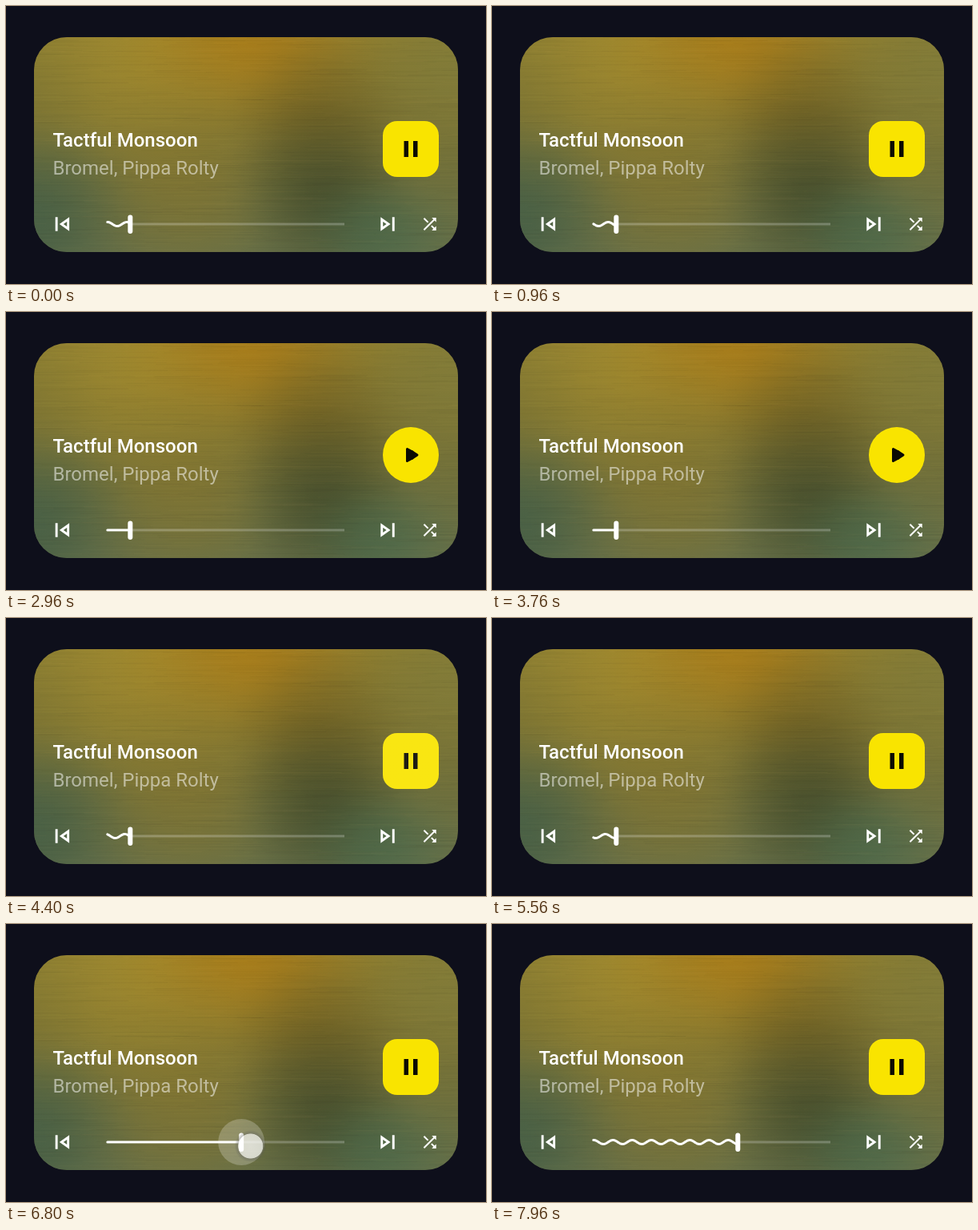
An HTML page with a canvas that plays this animation: 600x348 px, repeating every 8 s.

```html
<!DOCTYPE html>
<html lang="en">
<head>
<meta charset="utf-8">
<title>Music player card</title>
<style>
  html, body { margin: 0; width: 100%; height: 100%; overflow: hidden; background: #0e0f1b; }
  #stage { position: relative; width: 600px; height: 348px; }
  canvas { position: absolute; left: 0; top: 0; }
  p {
    position: absolute; left: 58.5px; margin: 0; white-space: nowrap;
    font: 400 24px/28px Roboto, sans-serif; color: rgba(255, 255, 255, .52);
  }
  #title { top: 154px; font-weight: 500; color: #fff; }
  #artist { top: 189px; }
</style>
</head>
<body>
<div id="stage">
  <canvas id="back" width="600" height="348"></canvas>
  <p id="title">Tactful Monsoon</p>
  <p id="artist">Bromel, Pippa Rolty</p>
  <canvas id="front" width="600" height="348"></canvas>
</div>
<script>
const LOOP = 8000;
const TAPS = [{ down: 1960, up: 2120 }, { down: 3960, up: 4120 }];
const DRAG = { down: 6130, from: 6200, to: 7033, up: 7200 };
const TAP_POINT = { x: 525, y: 201 };
const BUTTON = { x: 471, y: 144, size: 70 };
const TRACK = { left: 126, right: 423, y: 273 };
const WAVE = { length: 24, height: 2.5, period: 4000 };
const YELLOW = '#f9e400';

const ICONS = [
  { x: 53, y: 255.6, scale: 1.45, path: 'M6 6h2v12H6zm3.5 6l8.5 6V6l-8.5 6zm6.5 2.14L12.97 12 16 9.86v4.28z' },
  { x: 459.6, y: 255.6, scale: 1.45, path: 'M6 18l8.5-6L6 6v12zm2-8.14L11.03 12 8 14.14V9.86zM16 6h2v12h-2z' },
  { x: 517.7, y: 261, scale: 1, path: 'M10.59 9.17 5.41 4 4 5.41l5.17 5.17 1.42-1.41zM14.5 4l2.04 2.04L4 18.59 5.41 20 17.96 7.46 20 9.5V4h-5.5zm.33 9.41-1.41 1.41 3.13 3.13L14.5 20H20v-5.5l-2.04 2.04-3.13-3.13z' }
];

const back = document.getElementById('back').getContext('2d');
const ctx = document.getElementById('front').getContext('2d');

const clamp = v => Math.min(1, Math.max(0, v));
const mix = (a, b, p) => a + (b - a) * p;
const ramp = (t, start, span) => clamp((t - start) / span);
const easeOut = p => 1 - (1 - p) ** 3;
const easeInOut = p => p < .5 ? 4 * p ** 3 : 1 - 4 * (1 - p) ** 3;
const white = alpha => `rgba(255,255,255,${alpha})`;

function roundRect(c, x, y, w, h, r) {
  c.beginPath();
  c.roundRect(x, y, w, h, r);
}

function disc(x, y, r, fill) {
  ctx.fillStyle = fill;
  ctx.beginPath();
  ctx.arc(x, y, r, 0, Math.PI * 2);
  ctx.fill();
}

function glow(x, y, rx, ry, rgb, alpha) {
  back.save();
  back.translate(x, y);
  back.scale(rx, ry);
  const g = back.createRadialGradient(0, 0, 0, 0, 0, 1);
  for (let i = 0; i <= 8; i++) {
    const fall = (1 + Math.cos(Math.PI * i / 8)) / 2;
    g.addColorStop(i / 8, `rgba(${rgb},${alpha * fall})`);
  }
  back.fillStyle = g;
  back.fillRect(-1, -1, 2, 2);
  back.restore();
}

function drawCard() {
  back.save();
  roundRect(back, 35, 39, 530, 269, 41);
  back.clip();
  const base = back.createLinearGradient(0, 39, 0, 308);
  ['#8a7d32', '#7c7433', '#6e6f3c', '#666f48'].forEach((color, i) => base.addColorStop(i / 3, color));
  back.fillStyle = base;
  back.fillRect(35, 39, 530, 270);

  glow(195, 70, 210, 190, '172,144,44', .65);
  glow(310, 35, 190, 150, '172,122,20', .75);
  glow(225, 210, 150, 190, '134,118,46', .6);
  glow(390, 150, 130, 130, '98,82,26', .5);
  glow(400, 240, 130, 130, '62,72,42', .7);
  glow(30, 265, 150, 140, '64,92,70', .75);
  glow(470, 285, 120, 90, '70,104,76', .6);
  glow(570, 80, 130, 140, '128,124,60', .6);

  // Faint brushed grain
  let seed = 7;
  const random = () => (seed = seed * 16807 % 2147483647) / 2147483647;
  for (let i = 0; i < 900; i++) {
    back.fillStyle = random() < .5 ? 'rgba(255,215,110,.025)' : 'rgba(30,30,10,.03)';
    back.fillRect(random() * 560, 39 + random() * 270, 30 + random() * 90, 1);
  }
  back.restore();
}

function drawIcons() {
  back.fillStyle = '#fff';
  for (const { x, y, scale, path } of ICONS) {
    back.save();
    back.translate(x, y);
    back.scale(scale, scale);
    back.fill(new Path2D(path));
    back.restore();
  }
}

function pausedAmount(t) {
  const [stop, start] = TAPS.map(tap => easeOut(ramp(t, tap.up, 260)));
  return stop - start;
}

function drawGlyph(paused) {
  // Each bar becomes half of the triangle
  const halves = [
    [[497.5, 169, 501.5, 171.5], [503, 169, 508, 175], [503, 189, 508, 183], [497.5, 189, 501.5, 186.5]],
    [[509, 169, 507.5, 174.8], [514.5, 169, 514, 179], [514.5, 189, 514, 179], [509, 189, 507.5, 183.2]]
  ];
  ctx.fillStyle = ctx.strokeStyle = '#0b0a02';
  ctx.lineJoin = 'round';
  ctx.lineWidth = 3 * paused;
  for (const points of halves) {
    ctx.beginPath();
    for (const [x, y, playX, playY] of points) ctx.lineTo(mix(x, playX, paused), mix(y, playY, paused));
    ctx.closePath();
    ctx.fill();
    if (paused > .01) ctx.stroke();
  }
}

function drawRipple(t, { down, up }) {
  const alpha = .16 * ramp(t, down, 40) * (1 - ramp(t, up, 500));
  if (alpha <= 0) return;
  const p = ramp(t, down, 225);
  const x = mix(TAP_POINT.x, 506, p);
  const y = mix(TAP_POINT.y, 179, p);
  const r = mix(30, 75, p);
  const g = ctx.createRadialGradient(x, y, 0, x, y, r);
  g.addColorStop(.65, white(alpha));
  g.addColorStop(1, white(0));
  disc(x, y, r, g);
}

function drawButton(t) {
  const paused = pausedAmount(t);
  const { x, y, size } = BUTTON;
  ctx.save();
  roundRect(ctx, x, y, size, size, mix(18, size / 2, paused));
  ctx.fillStyle = YELLOW;
  ctx.fill();
  ctx.clip();
  drawGlyph(paused);
  TAPS.forEach(tap => drawRipple(t, tap));
  ctx.restore();
}

const thumbX = t => mix(155.3, 307.3, easeInOut(ramp(t, DRAG.from, DRAG.to - DRAG.from)));

function drawSlider(t) {
  const x = thumbX(t);
  const { left, right, y } = TRACK;
  const held = easeOut(ramp(t, DRAG.down, 250)) - easeOut(ramp(t, DRAG.up, 300));
  const height = WAVE.height * (1 - pausedAmount(t)) * (1 - held);

  ctx.lineWidth = 3;
  ctx.lineCap = 'butt';
  ctx.strokeStyle = white(.24);
  ctx.beginPath();
  ctx.moveTo(x, y);
  ctx.lineTo(right, y);
  ctx.stroke();

  ctx.lineCap = ctx.lineJoin = 'round';
  ctx.strokeStyle = '#fff';
  ctx.beginPath();
  for (let px = left + .8; px < x; px++) {
    const turn = (px - left - 1) / WAVE.length + t / WAVE.period;
    ctx.lineTo(px, y - height * Math.cos(turn * Math.PI * 2));
  }
  ctx.stroke();

  if (held > 0) disc(x, y, 29 * Math.sqrt(held), white(.23 * held));
  ctx.fillStyle = '#fff';
  roundRect(ctx, x - 3, y - 11.5, 6, 23.5, 3);
  ctx.fill();
}

function drawTouch(x, y) {
  const g = ctx.createRadialGradient(x, y, 0, x, y, 20);
  g.addColorStop(0, white(.7));
  g.addColorStop(.76, white(.66));
  g.addColorStop(.8, 'rgba(100,100,95,.4)');
  g.addColorStop(1, 'rgba(80,80,80,0)');
  disc(x, y, 20, g);
}

const within = (t, { down, up }) => t >= down && t < up;

function draw(t) {
  ctx.clearRect(0, 0, 600, 348);
  drawButton(t);
  drawSlider(t);
  if (TAPS.some(tap => within(t, tap))) drawTouch(TAP_POINT.x, TAP_POINT.y);
  if (within(t, DRAG)) drawTouch(thumbX(t) + 11.5, 278);
}

drawCard();
drawIcons();
const start = performance.now();
function tick() {
  draw((performance.now() - start) % LOOP);
  requestAnimationFrame(tick);
}
tick();
</script>
</body>
</html>
```
